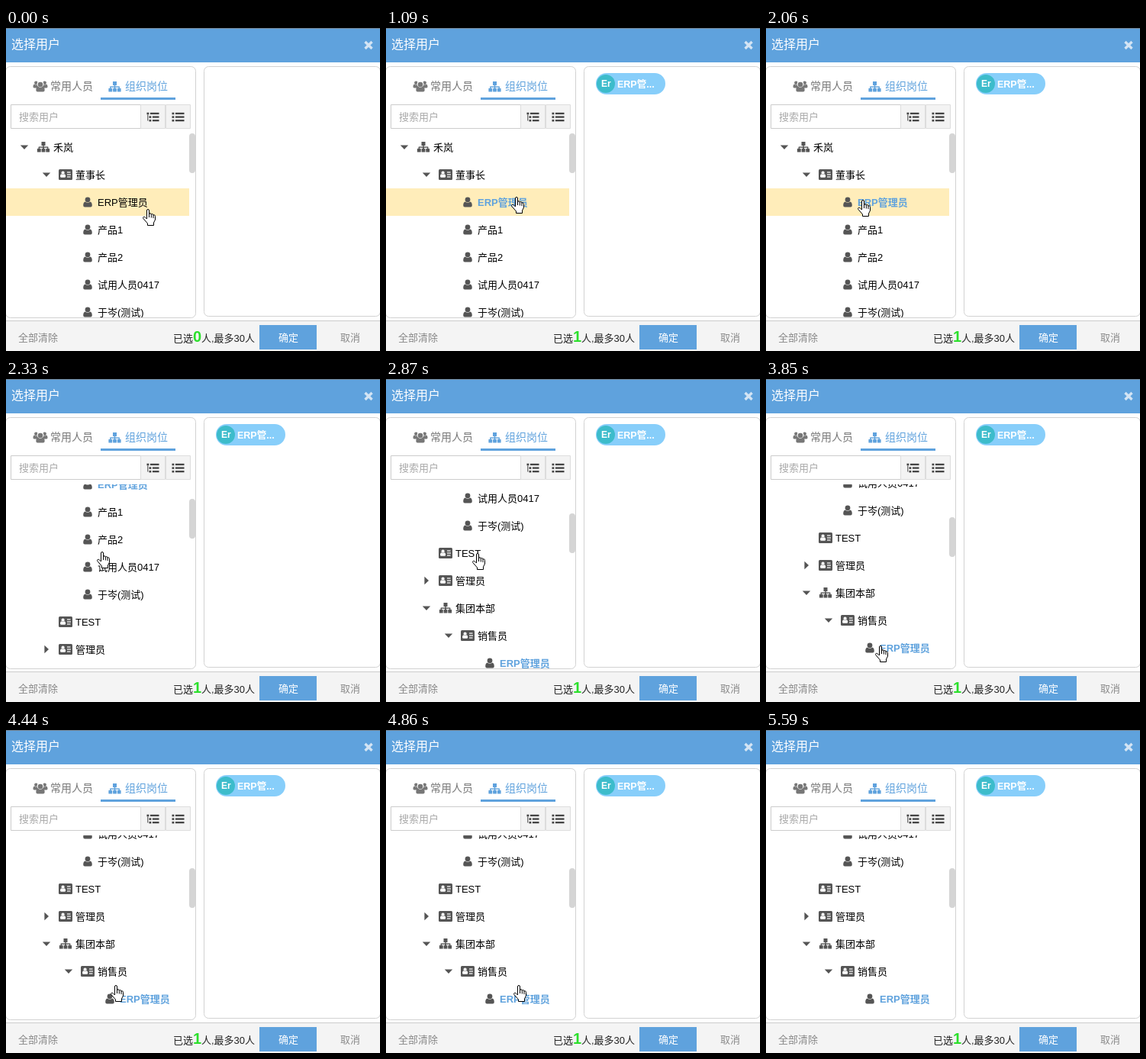
Recreate the animation shown at these times as an HTML page with a canvas. Size 490x423 px, loop 6020 ms.

```html
<!DOCTYPE html>
<html lang="zh-CN">
<head>
<meta charset="utf-8">
<title>选择用户</title>
<style>
html, body { margin: 0; width: 100%; height: 100%; overflow: hidden; background: #fff; }
canvas { display: block; }
</style>
</head>
<body>
<canvas id="stage" width="490" height="423"></canvas>
<script>
const ctx = document.getElementById('stage').getContext('2d', { alpha: false });
const LOOP = 6020, ROW = 36, LIST_TOP = 138, LIST_BOTTOM = 379, SELECT_AT = 1090;
const BLUE = '#5fa2dd', DARK = '#555', GREY = '#888';
const FONT = '"Liberation Sans", "Noto Sans CJK SC", "Noto Sans CJK", sans-serif';

// [level, icon, label, caret]
const TREE = [
  [0, sitemap, '禾岚', 'down'],
  [1, card, '董事长', 'down'],
  [2, person, 'ERP管理员'],
  [2, person, '产品1'],
  [2, person, '产品2'],
  [2, person, '试用人员0417'],
  [2, person, '于岑(测试)'],
  [1, card, 'TEST'],
  [1, card, '管理员', 'right'],
  [1, sitemap, '集团本部', 'down'],
  [2, card, '销售员', 'down'],
  [3, person, 'ERP管理员']
];

// [time, left, top] of the pointer
const POINTER = [
  [0, 179, 237], [150, 173, 236], [300, 169, 229], [420, 165, 222], [850, 164, 221],
  [1520, 112, 191], [1640, 77, 194], [1790, 101, 212], [1910, 118, 225], [2060, 120, 225],
  [2210, 119, 226], [2480, 117, 227], [2720, 114, 228], [2870, 113, 228],
  [3140, 104, 242], [3270, 82, 268], [3390, 62, 293], [3540, 56, 318], [3700, 103, 339],
  [3850, 143, 349], [3990, 142, 348], [4140, 124, 352], [4290, 145, 361], [4440, 137, 334],
  [4590, 124, 348], [4710, 115, 362], [4860, 167, 334], [5020, 206, 316],
  [5170, 261, 359], [5320, 345, 382], [5440, 443, 403]
];
const SCROLL = [[0, 0], [2210, 30], [2330, 90], [2480, 100], [2720, 120], [2870, 180], [2990, 200]];
const HOVER = [[0, 2], [2210, -1], [2600, 5], [2720, -1], [3140, 8], [3270, 9], [3390, -1],
  [3540, 10], [3850, -1], [4590, 10], [4710, -1], [5020, 10], [5170, -1]];

const at = (steps, t) => steps.findLast(step => step[0] <= t);

function rect(x, y, w, h, color) {
  ctx.fillStyle = color;
  ctx.fillRect(x, y, w, h);
}

function round(x, y, w, h, r, fill, stroke) {
  ctx.beginPath();
  ctx.roundRect(x, y, w, h, r);
  if (fill) { ctx.fillStyle = fill; ctx.fill(); }
  if (stroke) { ctx.strokeStyle = stroke; ctx.lineWidth = 1; ctx.stroke(); }
}

function disc(x, y, r, color) {
  ctx.beginPath();
  ctx.arc(x, y, r, 0, 7);
  ctx.fillStyle = color;
  ctx.fill();
}

function label(text, x, middle, size, color, weight = 'normal') {
  ctx.font = `${weight} ${size}px ${FONT}`;
  ctx.fillStyle = color;
  ctx.fillText(text, x, middle + Math.round(size * 0.37));
}

function person(x, y, color = DARK, scale = 1) {
  ctx.save();
  ctx.translate(x, y);
  ctx.scale(scale, scale);
  disc(0, -3.2, 3.4, color);
  ctx.fill(new Path2D('M-3.2 -.6Q0 2 3.2 -.6Q5.8 .2 5.8 4.2Q5.8 6.5 3.8 6.5H-3.8Q-5.8 6.5 -5.8 4.2Q-5.8 .2 -3.2 -.6Z'));
  ctx.restore();
}

function people(x, y, color) {
  for (const side of [-1, 1]) person(x + side * 5.6, y - 2, color, 0.68);
  disc(x, y - 2.6, 4.4, '#fff');
  person(x, y + 1.2, color, 0.98);
}

function sitemap(x, y, color = DARK) {
  rect(x - 2.5, y - 7, 5, 5, color);
  rect(x - 0.7, y - 2, 1.4, 4, color);
  rect(x - 6.2, y - 0.6, 12.4, 1.4, color);
  for (const dx of [-5.7, 0, 5.7]) {
    rect(x + dx - 0.7, y, 1.4, 3, color);
    round(x + dx - 2.4, y + 2, 4.8, 4.6, 0.6, color);
  }
}

function card(x, y) {
  round(x - 9, y - 7, 18, 14, 1.5, DARK);
  person(x - 3.4, y - 0.3, '#fff', 0.62);
  for (const dy of [-3, 0, 3]) rect(x + 2, y + dy - 0.6, dy ? 4.5 : 5, 1.2, '#fff');
}

function caret(x, y, direction) {
  ctx.fillStyle = DARK;
  ctx.save();
  ctx.translate(x, y);
  if (direction === 'right') ctx.rotate(-Math.PI / 2);
  ctx.fill(new Path2D('M-5.2 -2.6H5.2L0 3Z'));
  ctx.restore();
}

function listIcon(x, y, nested) {
  for (let i = 0; i < 3; i++) {
    const dy = (i - 1) * 4.6, indent = nested && i ? 3 : 0;
    rect(x - 8 + indent, y + dy - 1.2, 2.8, 2.6, '#444');
    rect(x - 3.6 + indent, y + dy - 1.1, 11.6 - indent, 2.3, '#444');
  }
  if (nested) rect(x - 7.2, y - 3, 1, 8, '#444');
}

function drawHeader() {
  rect(0, 0, 490, 45, BLUE);
  rect(0, 0, 490, 1, '#71808e');
  label('选择用户', 7, 21, 16, '#fff');
  ctx.strokeStyle = '#d3e4f4';
  ctx.lineWidth = 3.4;
  ctx.stroke(new Path2D('M470.5 18L479.5 27M479.5 18L470.5 27'));
}

function drawTabs() {
  people(45, 76, '#777');
  label('常用人员', 58, 76, 14, '#777');
  sitemap(142.5, 77, BLUE);
  label('组织岗位', 156, 76, 14, BLUE);
  rect(124, 91, 98, 3, BLUE);
  round(6.5, 100.5, 170, 31, 0, '#fff', '#ccc');
  label('搜索用户', 17, 116, 13, '#aaa');
  round(176.5, 100.5, 32, 31, 0, '#f3f3f3', '#ddd');
  round(209.5, 100.5, 32, 31, 0, '#f3f3f3', '#ddd');
  listIcon(192.5, 116.5, true);
  listIcon(225.5, 116.5, false);
}

function drawTree(scroll, hover, selected) {
  ctx.save();
  ctx.beginPath();
  ctx.rect(0, LIST_TOP, 249, LIST_BOTTOM - LIST_TOP);
  ctx.clip();
  TREE.forEach(([level, icon, text, direction], i) => {
    const top = LIST_TOP + i * ROW - scroll, y = top + ROW / 2, x = level * 29;
    if (i === hover) rect(0, top, 240, ROW, '#ffedba');
    if (direction) caret(24 + x, y, direction);
    icon(49 + x, y);
    const active = selected && text === 'ERP管理员';
    label(text, 62 + x, y, 13, active ? BLUE : '#000', active ? 'bold' : 'normal');
  });
  round(240, LIST_TOP + Math.round(scroll * 0.213), 8, 52, 4, '#d5d5d5');
  ctx.restore();
}

function drawChip() {
  round(275, 59, 91, 28, 14, '#87cefa');
  disc(288, 73, 12, '#3dbccb');
  label('Er', 282, 73, 12, '#fff', 'bold');
  label('ERP管...', 303, 73, 12.5, '#fff', 'bold');
}

function drawFooter(count, cancelHover) {
  rect(0, 383, 490, 40, '#f4f4f4');
  rect(0, 383, 490, 1, '#ccc');
  label('全部清除', 16, 405, 13, GREY);
  label('已选', 219, 406, 13, '#222');
  label(count, 245, 404, 20, '#2be02b', 'bold');
  label('人,最多30人', 256, 406, 13, '#222');
  rect(332, 389, 75, 32, BLUE);
  label('确定', 357, 405, 13, '#fff');
  label('取消', 438, 405, 13, cancelHover ? '#444' : GREY);
}

const HAND = new Path2D('M5.5 13V2Q5.5 .5 7 .5Q8.5 .5 8.5 2V7Q8.5 5.7 10 5.7Q11.3 5.7 11.3 7.5Q11.5 6.5 12.7 6.5Q14 6.5 14 8.5Q14.2 7.6 15.2 7.8Q16.5 8 16.5 9.5V14L14.5 18V21.5H6.5V19L1 12.7Q0 11 1.2 10.4Q2.5 9.8 4 11.5Z');
const CREASES = new Path2D('M8.5 7V11M11.3 7.5V11.5M14 8.5V12');
const ARROW = new Path2D('M.5 .8V16L4 12.7L6.5 18.3L8.7 17.3L6.3 11.8H11.2Z');

function drawPointer(x, y, arrow) {
  ctx.save();
  ctx.translate(x, y);
  ctx.fillStyle = '#fff';
  ctx.strokeStyle = '#000';
  ctx.lineWidth = 1;
  ctx.fill(arrow ? ARROW : HAND);
  ctx.stroke(arrow ? ARROW : HAND);
  if (!arrow) ctx.stroke(CREASES);
  ctx.restore();
}

function draw(now) {
  const t = now % LOOP;
  const selected = t >= SELECT_AT, cancelHover = t >= 5440 && t < 5590;
  rect(0, 0, 490, 423, '#fff');
  drawHeader();
  round(-0.5, 50.5, 249, 329, 6, '#fff', '#d2d2d2');
  round(259.5, 50.5, 231, 327, 6, '#fff', '#d2d2d2');
  drawTabs();
  drawTree(at(SCROLL, t)[1], at(HOVER, t)[1], selected);
  if (selected) drawChip();
  drawFooter(selected ? '1' : '0', cancelHover);
  if (t < 5590) {
    const [, x, y] = at(POINTER, t);
    drawPointer(x, y, t >= 5170 && t < 5440);
  }
}

const start = performance.now();
function tick() {
  draw(performance.now() - start);
  requestAnimationFrame(tick);
}
tick();
</script>
</body>
</html>
```
